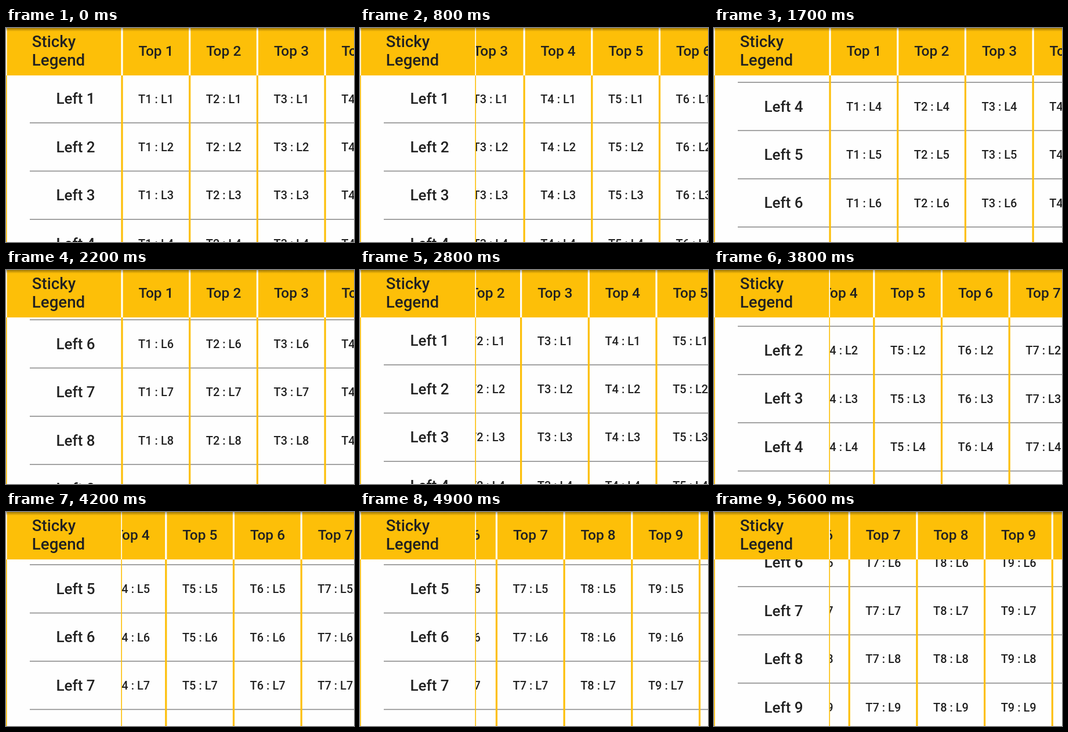
An HTML page with a canvas that plays this animation: 600 by 370 pixels, repeating every 5700 ms.

```html
<!DOCTYPE html>
<html lang="en">
<head>
<meta charset="utf-8">
<title>Sticky table</title>
<style>
  html, body { margin: 0; width: 100%; height: 100%; overflow: hidden; background: #fff; }
  canvas { display: block; }
</style>
</head>
<body>
<canvas id="stage" width="600" height="370"></canvas>
<script>
const ctx = document.getElementById('stage').getContext('2d');
const WIDTH = 600, HEIGHT = 370, LOOP = 5700, STEP = 100;
const SIDE = 200, HEAD = 82;          // sticky column width, sticky row height
const COL = 116.7, ROW = 83.4, COUNT = 13;
const AMBER = '#fdbf08', WHITE = '#fefefe', GRAY = '#8c8c8c', INK = '#212121';
const BORDER = 1.6;

// Each move: start ms, end ms, scroll offset reached, deceleration
const MOVES_X = [
  [100, 800, 267, 1], [800, 1300, 0, 1],
  [2500, 3500, 391, 1.6], [4400, 5000, 667, 1.6]
];
const MOVES_Y = [
  [1300, 2104, 477.5, 1], [2104, 2500, 0, 1],
  [3700, 4200, 323, 1.6], [5200, 5600, 452, 1.6]
];

function scrollAt(time, moves) {
  return moves.reduce((from, [start, end, to, power]) => {
    const p = Math.min(1, Math.max(0, (time - start) / (end - start)));
    const eased = 1 - (1 - p) ** power;
    return from + (to - from) * (1 - Math.cos(Math.PI * eased)) / 2;
  }, 0);
}

function rect(x, y, w, h, color) {
  ctx.fillStyle = color;
  ctx.fillRect(x, y, w, h);
}

function text(label, x, y, size, align = 'center') {
  ctx.font = `500 ${size}px Roboto, sans-serif`;
  ctx.textAlign = align;
  ctx.fillStyle = INK;
  ctx.fillText(label, x, y);
}

// Clipped area filled with a background before its content
function pane(x, y, w, h, color, content) {
  ctx.save();
  ctx.beginPath();
  ctx.rect(x, y, w, h);
  ctx.clip();
  rect(x, y, w, h, color);
  content();
  ctx.restore();
}

function each(content) {
  for (let i = 0; i < COUNT; i++) content(i);
}

function columnLines(scrollX, color) {
  each(i => rect(SIDE + i * COL - scrollX - BORDER, 0, BORDER * 2, HEIGHT, color));
}

function sideLines(color) {
  rect(0, 0, BORDER, HEIGHT, color);
  rect(SIDE - BORDER, 0, BORDER, HEIGHT, color);
}

function rowLines(left, scrollY) {
  each(i => rect(left, 163.2 + i * ROW - scrollY, WIDTH, 1.6, GRAY));
}

function draw(time) {
  const sx = scrollAt(time, MOVES_X), sy = scrollAt(time, MOVES_Y);
  const colX = i => SIDE + 58.6 + i * COL - sx;
  const rowY = i => i * ROW - sy;

  pane(SIDE, HEAD, WIDTH - SIDE, HEIGHT - HEAD, WHITE, () => {
    rowLines(SIDE, sy);
    columnLines(sx, AMBER);
    each(c => each(r => text(`T${c + 1} : L${r + 1}`, colX(c), 129.5 + rowY(r), 20)));
  });
  pane(0, HEAD, SIDE, HEIGHT - HEAD, WHITE, () => {
    rowLines(41, sy);
    sideLines(AMBER);
    each(r => text(`Left ${r + 1}`, 120, 131.3 + rowY(r), 26));
  });
  pane(SIDE, 0, WIDTH - SIDE, HEAD, AMBER, () => {
    columnLines(sx, WHITE);
    each(c => text(`Top ${c + 1}`, colX(c), 48, 24.5));
  });
  pane(0, 0, SIDE, HEAD, AMBER, () => {
    sideLines(WHITE);
    text('Sticky', 44.8, 32.8, 27.7, 'left');
    text('Legend', 44.8, 64.5, 27.7, 'left');
  });

  const shade = ctx.createLinearGradient(0, 0, 0, 6);
  shade.addColorStop(0, 'rgba(0,0,0,.36)');
  shade.addColorStop(1, 'rgba(0,0,0,0)');
  rect(0, 0, WIDTH, 6, shade);
}

function tick() {
  draw(Math.floor(performance.now() % LOOP / STEP) * STEP);
  requestAnimationFrame(tick);
}
tick();
</script>
</body>
</html>
```
